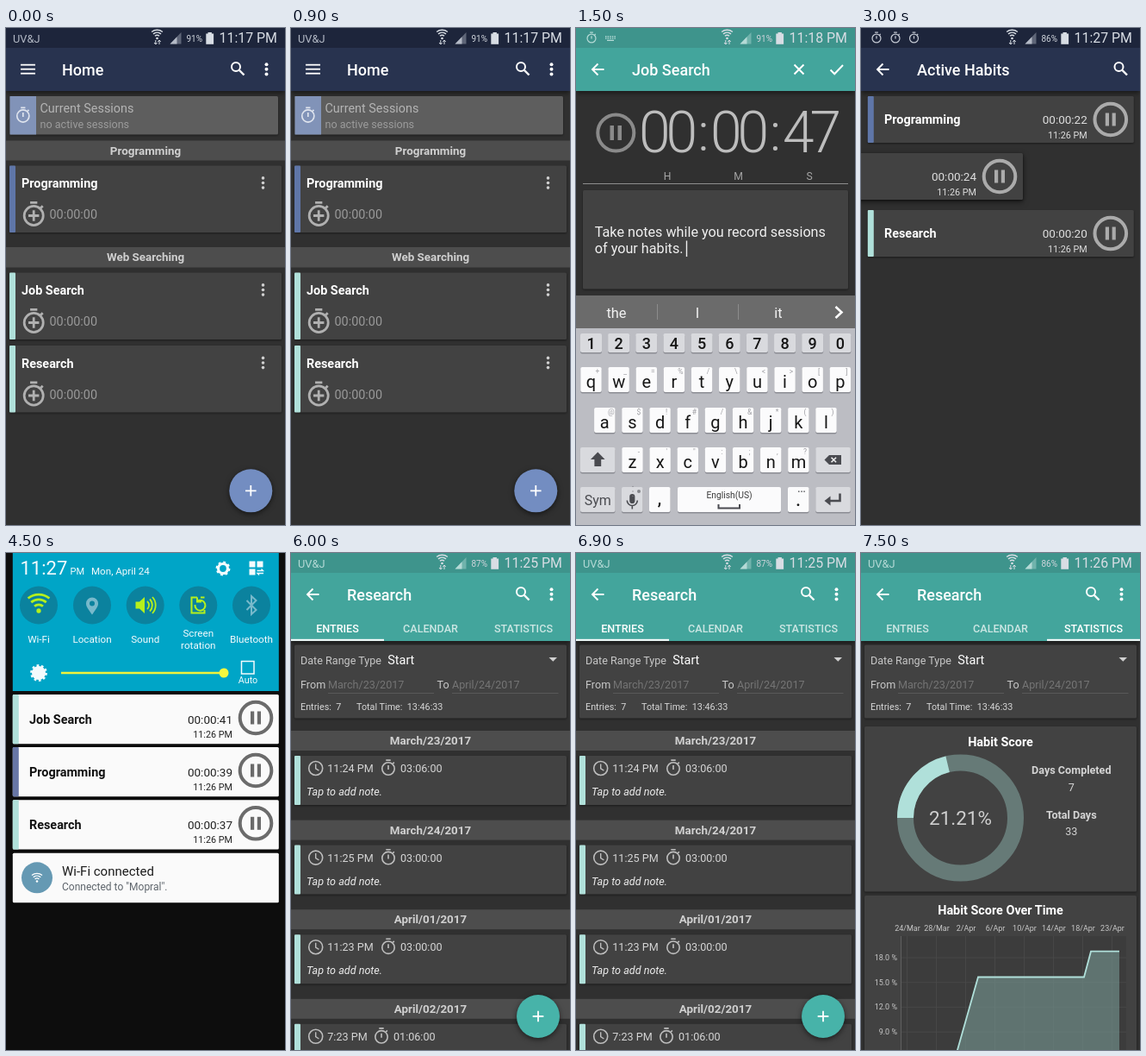
These frames come from a looping animation (324x576 px, 8 s). An HTML page:

```html
<!DOCTYPE html>
<html lang="en">
<head>
<meta charset="utf-8">
<title>Habit timer tour</title>
<style>
html, body { margin: 0; width: 100%; height: 100%; overflow: hidden; background: #303030; }
svg { display: block; width: 100vw; height: 100vh; font-family: Roboto, sans-serif; }
text { white-space: pre; }
.card { filter: drop-shadow(0 1px 1px rgba(0,0,0,.45)); }
.lift { filter: drop-shadow(0 2px 3px rgba(0,0,0,.55)); }
</style>
</head>
<body>
<svg id="stage" viewBox="0 0 324 576"></svg>
<script>
const LENGTH = 8000, STEP = 1500;
const NAVY = { status: '#1d253b', bar: '#28334f', ink: '#b4bac6' };
const TEAL = { status: '#3e948c', bar: '#43a59c', ink: '#b5dad6' };
const BLUE = '#5f76a8', MINT = '#b0e0da', CARD = '#424242';

// Drawing helpers
const rect = (x, y, w, h, fill, extra = '') =>
  `<rect x="${x}" y="${y}" width="${w}" height="${h}" fill="${fill}" ${extra}/>`;
const disc = (x, y, r, fill, extra = '') =>
  `<circle cx="${x}" cy="${y}" r="${r}" fill="${fill}" ${extra}/>`;
const ring = (x, y, r, color, w) => disc(x, y, r, 'none', `stroke="${color}" stroke-width="${w}"`);
const line = (d, color, w = 1, extra = '') =>
  `<path d="${d}" fill="none" stroke="${color}" stroke-width="${w}" ${extra}/>`;
const shape = (d, fill) => `<path d="${d}" fill="${fill}"/>`;
const at = (x, y, s, body) => `<g transform="translate(${x} ${y}) scale(${s})">${body}</g>`;
const text = (x, y, str, size, fill, { w = 400, a = 'start', extra = '' } = {}) =>
  `<text x="${x}" y="${y}" font-size="${size}" fill="${fill}" font-weight="${w}" text-anchor="${a}" ${extra}>${
    String(str).replace(/&/g, '&amp;').replace(/</g, '&lt;')}</text>`;
const mid = (x, y, str, size, fill, w = 400) => text(x, y, str, size, fill, { w, a: 'middle' });
const end = (x, y, str, size, fill) => text(x, y, str, size, fill, { a: 'end' });
const bold = (x, y, str, fill = '#fff') => text(x, y, str, 14.4, fill, { w: 700 });

// Icons
const watch = (x, y, s, color, inner = 'M0-4.5V1', w = 2) => at(x, y, s,
  ring(0, 0, 8, color, w) + line(`M-3-11H3M5.8-6.4L7.6-8.2${inner}`, color, w));
const clock = (x, y, color) => ring(x, y, 8, color, 1.6) + line(`M${x} ${y - 5}v5.4l3.7 2.3`, color, 1.4);
const pause = (x, y, color, r = 18.3, w = 4) => ring(x, y, r, color, w) +
  rect(x - 6, y - 7.5, 4.2, 15, color) + rect(x + 1.8, y - 7.5, 4.2, 15, color);
const dots = (x, y, r, color) => [-5.6, 0, 5.6].map(d => disc(x, y + d, r, color)).join('');
const search = (x, y) => ring(x - 2, y - 2, 5, '#fff', 2) + line(`M${x + 2} ${y + 2}l5.5 5.5`, '#fff', 2.4);
const back = line('M32.5 48H20M25.5 41.5L19 48l6.5 6.5', '#fff', 1.9);
const menu = [42, 47, 52].map(y => rect(17, y - .2, 17, 1.8, '#fff')).join('');
const wifi = (x, y, s, color) => at(x, y, s, disc(0, 0, 1.6, color) +
  line('M-3-3.2A4.5 4.5 0 0 1 3-3.2M-5.3-6A8.2 8.2 0 0 1 5.3-6M-7.5-8.8A11.8 11.8 0 0 1 7.5-8.8', color, 1.7));
const fab = (x, y, fill) => `<g class="lift">${disc(x, y, 25, fill)}</g>` +
  line(`M${x - 6.3} ${y}h12.6M${x} ${y - 6.3}v12.6`, '#fff', 1.8);

// Shared screen parts
function header(theme, title, time, charge, left, height = 50) {
  const c = theme.ink;
  return `<g class="lift">${rect(0, 22, 324, height + 1, theme.bar)}</g>` +
    rect(0, 0, 324, 23, theme.status) + left +
    wifi(175.5, 12, .85, '#d8dde4') +
    line('M173.8 14v5M172 17l1.8 2 1.8-2M178 19v-5M176.3 16l1.7-2 1.7 2', '#d8dde4', 1) +
    shape('M190.5 18.5L203.5 5v13.5z', c + '70') + shape('M190.5 18.5L198.5 10.2v8.3z', c) +
    text(209.5, 16, charge + '%', 10, '#d0d5dc') +
    rect(234.5, 5, 4.4, 2, '#d8dde4') + rect(232.3, 6.5, 8.8, 12.3, '#d8dde4') +
    end(315, 17, time, 15.9, '#d8dde4') +
    text(65, 54.5, title, 18, '#fff', { w: 500 });
}
const carrier = theme => text(8, 16.5, 'UV&J', 12.8, theme.ink);
const card = (x, y, w, h, strip, fill = CARD) =>
  `<g class="card">${rect(x, y, w, h, fill, 'rx="1.5"')}</g>` + (strip ? rect(x, y, 7, h, strip, 'rx="1"') : '');
const section = (y, h, label) => rect(0, y, 324, h, '#4d4d4d') + mid(162, y + 16, label, 13.4, '#d0d0d0', 700);

function home() {
  const habit = (y, name, color) => card(4, y, 316, 77.5, color) + bold(18, y + 25.5, name) +
    dots(298.5, y + 20, 1.8, '#d0d0d0') +
    watch(32.2, y + 58, 1.38, '#b0b0b0', 'M-4.5 0H4.5M0-4.5V4.5') +
    text(50.5, y + 61.8, '00:00:00', 14.4, '#999');
  return header(NAVY, 'Home', '11:17 PM', 91, carrier(NAVY)) + menu + search(269, 47) + dots(302.5, 47.8, 2, '#fff') +
    card(4.5, 79, 311.5, 44.5, '', '#5e5e5e') + rect(4.5, 79, 30.5, 44.5, '#8193b8') +
    watch(19.8, 102, .88, '#dfe4ee', 'M0-4.5V1', 1.9) +
    text(39.5, 98, 'Current Sessions', 14.4, '#b4b4b4') + text(39.5, 115.5, 'no active sessions', 12.6, '#9c9c9c') +
    section(130.5, 23, 'Programming') + habit(159.5, 'Programming', BLUE) +
    section(254, 23.5, 'Web Searching') + habit(283.5, 'Job Search', MINT) + habit(368, 'Research', MINT) +
    fab(284.3, 536.3, '#738dc1');
}

function keyboard() {
  const pitch = 32.15;
  const key = (x, y, w, h, fill = '#fbfbfc') =>
    rect(x, y + 1.5, w, h, '#8c8d94', 'rx="2"') + rect(x, y, w, h, fill, 'rx="2"');
  const row = (keys, hints, x, y) => [...keys].map((k, i) => {
    const cx = x + i * pitch;
    return key(cx - 12.2, y, 24.4, 29) + mid(cx, y + 23.5, k, 20, '#161616') +
      mid(cx + 7.5, y + 7.5, hints[i], 8.5, '#a0a0a5');
  }).join('');
  const soft = '#d9dade', ink = '#4a4b50';
  return rect(0, 310, 324, 38, '#6b6b6b') + line('M94.5 320v18M188.5 320v18', '#8c8c8c') +
    ['the', 'I', 'it'].map((s, i) => mid(47 + 94 * i, 336, s, 16.4, '#f2f2f2')).join('') +
    line('M301.5 323l7 6.5-7 6.5', '#fff', 2.6) +
    rect(0, 348, 324, 228, '#bcbdc3') +
    [...'1234567890'].map((n, i) => key(5 + i * pitch, 354, 25, 22, soft) +
      mid(17.5 + i * pitch, 371.8, n, 18, '#161616', 500)).join('') +
    row('qwertyuiop', '+_=%/\\<>[]', 17.5, 393) +
    row('asdfghjkl', '@$!#/&*()', 33.3, 440) +
    row('zxcvbnm', '-\'":;,?', 65.5, 486) +
    key(5, 486, 40.5, 29, soft) + shape('M25.3 491.5l8.3 8.5h-4.4v8h-7.8v-8h-4.4z', ink) +
    key(278.3, 486, 40.5, 29, soft) + shape('M288.5 500.5l5.5-5.5h14v11h-14z', ink) +
    line('M296.5 497.7l5.6 5.6M302.1 497.7l-5.6 5.6', '#eee', 1.6) +
    key(5, 532, 40.5, 29, soft) + mid(25.2, 552.5, 'Sym', 16, ink) +
    key(53, 532, 24.5, 29, soft) + rect(62.2, 540, 6.2, 11, ink, 'rx="3.1"') +
    line('M59.3 547.5a6 6 0 0 0 12 0M65.3 553.5v4', ink, 1.6) + disc(73, 537, 2, '#85868b') + dots(66, 537, .7, '#85868b') +
    key(85, 532, 24.5, 29) + mid(97, 552, ',', 20, '#161616', 500) +
    key(118, 532, 120, 29) + mid(178, 545.3, 'English(US)', 10.3, '#3c3c3c') +
    line('M165.5 552v4.5h24.500V552', ink, 2) +
    key(246, 532, 24.5, 29) + mid(258, 554, '.', 20, '#161616', 500) + mid(262, 537.5, '...', 11, '#55565a', 700) +
    key(278.3, 532, 40.5, 29, soft) + line('M306.5 539.5v8.500H292', ink, 2.6) + shape('M288.5 548l7-5.5v11z', ink);
}

function recording() {
  const pair = (x, s) => text(x - 2.5, 143.5, s, 66, '#bdbdbd', { w: 300, a: 'middle', extra: 'letter-spacing="-5"' });
  const keys = [0, 1, 2, 3, 4].map(i => `M${34 + i * 2.6} 10h1.5M${34 + i * 2.6} 12.200h1.5`).join('');
  return header(TEAL, 'Job Search', '11:18 PM', 91,
      watch(18, 12, .62, TEAL.ink) + line(keys + 'M36 14.300h8', TEAL.ink, 1.3)) + back +
    line('M253.500 42.500l11 11M264.500 42.500l-11 11', '#fff', 2) + line('M295.500 48.500l4.700 4.700L310 43', '#fff', 2) +
    ring(46.3, 121.500, 21, '#8a8a8a', 4) + rect(39.500, 113, 4.500, 17, '#8a8a8a') + rect(48.500, 113, 4.500, 17, '#8a8a8a') +
    pair(107, '00') + pair(190, '00') + pair(274, '47') +
    [148, 231.500].map(x => mid(x, 141.500, ':', 62, '#bdbdbd', 300)).join('') +
    ['H', 'M', 'S'].map((s, i) => mid(106 + 82.500 * i, 175.800, s, 12.2, '#a6a6a6')).join('') +
    line('M8 180.500H316', '#8e8e8e') + card(8, 188, 308, 114.500) +
    text(21.800, 242, 'Take notes while you record sessions', 16.2, '#f0f0f0') +
    text(21.800, 260.800, 'of your habits.', 16.2, '#f0f0f0') + rect(127.800, 246.500, 1.4, 18.500, '#eee') + keyboard();
}

function active() {
  const run = (x, y, name, time, color) => card(x, y, 309, 54, color) + bold(x + 19.200, y + 32, name) +
    end(x + 255, y + 32, time, 13.5, '#dedede') + end(x + 255, y + 48.500, '11:26 PM', 10.8, '#dedede') +
    pause(x + 282, y + 27, '#ababab');
  return header(NAVY, 'Active Habits', '11:27 PM', 86,
      [18, 40, 61.500].map(x => watch(x, 12, .62, '#c4c9d3')).join('')) + back + search(301.500, 47) +
    run(7.800, 79, 'Programming', '00:00:22', BLUE) +
    `<g class="lift">${run(-121, 145, '', '00:00:24', MINT)}</g>` +
    run(7.800, 211, 'Research', '00:00:20', MINT);
}

function shade() {
  const on = '#b5f01c', off = '#78b9cb', white = '#f4fbfd';
  const label = (x, y, s) => mid(x, y, s, 11.7, white);
  const cog = (x, y, r, n, w, hole) => {
    const c = 2 * Math.PI * (r + 1.4) / (2 * n);
    return ring(x, y, r, white, w) + disc(x, y, r + 1.4, 'none', `stroke="${white}" stroke-width="3" stroke-dasharray="${c}"`) +
      (hole ? '' : disc(x, y, r, white));
  };
  const note = (y, name, time, color) => card(7.800, y, 309, 57.300, color, '#fafafa') + bold(27, y + 33.500, name, '#111') +
    end(263, y + 33.500, time, 13.5, '#222') + end(263, y + 49.500, '11:26 PM', 10.8, '#222') +
    pause(290, y + 27, '#6b6b6b');
  return rect(0, 0, 324, 576, '#0d0d0d') + rect(7.800, 0, 309, 160, '#00a5c7') +
    text(16.500, 25, '11:27', 22, white) + text(74.500, 24.500, 'PM', 11, white) + text(99, 24.500, 'Mon, April 24', 11.6, white) +
    cog(252, 18, 5.5, 8, 3.2, true) +
    rect(282.500, 9.500, 7, 7, white) + rect(291.500, 9.500, 7, 7, white) + rect(282.500, 18.500, 7, 7, white) +
    line('M291.500 20.500h7l-2-2M299 23.500h-7l2 2', white, 1.3) +
    [38, 100, 161.700, 223.300, 285].map(x => disc(x, 60.500, 22, '#0b829e')).join('') +
    wifi(38, 67, 1.65, on) +
    shape('M100 71.500c-4-6-7-9-7-13a7 7 0 0 1 14 0c0 4-3 7-7 13z', off) + disc(100, 58.500, 3, '#0b829e') +
    shape('M150.500 56.500h4.500l6-5.500v19l-6-5.500h-4.500z', on) +
    line('M164 56a6 6 0 0 1 0 9M167 53.500a10 10 0 0 1 0 14M170 51a14 14 0 0 1 0 19', on, 1.8) +
    line('M222 51.500h-6.500v18h15V66M226 51.500h4.500', on, 2) +
    line('M219.500 60a6 6 0 1 0 3-4.500M222 51.500v5h5', on, 2) +
    line('M279.500 55l11 11-5.500 5V50l5.500 5-11 11', off, 2) +
    label(38, 104, 'Wi-Fi') + label(100, 104, 'Location') + label(161.700, 104, 'Sound') +
    label(223.300, 97, 'Screen') + label(223.300, 110.500, 'rotation') + label(285, 104, 'Bluetooth') +
    cog(38, 139, 7, 10, 2, false) +
    line('M64 139H253', '#f0f23c', 2.6) + disc(253, 139, 5.5, '#f6f83e') +
    rect(273.500, 125.500, 14.500, 14.500, 'none', `stroke="${white}" stroke-width="1.5"`) + mid(281, 151, 'Auto', 10.8, white) +
    note(164, 'Job Search', '00:00:41', MINT) + note(225, 'Programming', '00:00:39', '#6877a6') +
    note(286.300, 'Research', '00:00:37', MINT) +
    card(7.800, 347.800, 309, 57.500, '', '#fafafa') + disc(36, 376.300, 18, '#6599b3') + wifi(36, 380.500, .8, '#fff') +
    text(65, 374, 'Wi-Fi connected', 15, '#1c1c1c') + text(65, 390.500, 'Connected to "Mopral".', 12, '#5d646b');
}

function research(time, charge, tab, body) {
  const range = (x, label, dx, date, to) => text(x, 156.500, label, 12.6, '#c8c8c8') +
    text(dx, 156.500, date, 12.6, '#757575') + line(`M${dx} 162.500H${to}`, '#595959');
  return body + header(TEAL, 'Research', time, charge, carrier(TEAL), 79) +
    back + search(269, 47) + dots(302.500, 47.800, 2, '#fff') +
    ['ENTRIES', 'CALENDAR', 'STATISTICS'].map((s, i) =>
      mid(54 + 108 * i, 92, s, 12.6, i === tab ? '#fff' : '#cbe6e3', 500)).join('') +
    rect(108 * tab, 99.800, 108, 2, '#fff') + card(4, 106.500, 316, 85) +
    text(11, 129, 'Date Range Type', 12.6, '#c8c8c8') + text(112.300, 129, 'Start', 14.4, '#fff') +
    shape('M299.500 121h9.500l-4.700 4.800z', '#d0d0d0') +
    range(11, 'From', 43, 'March/23/2017', 166) + range(169.500, 'To', 187, 'April/24/2017', 310.500) +
    text(11, 182, 'Entries:  7', 10.8, '#d6d6d6') + text(76, 182, 'Total Time:', 10.8, '#d6d6d6') +
    text(134.800, 182, '13:46:33', 10.8, '#d6d6d6');
}

function entries() {
  const items = [
    ['March/23/2017', '11:24 PM', '03:06:00'], ['March/24/2017', '11:25 PM', '03:00:00'],
    ['April/01/2017', '11:23 PM', '03:00:00'], ['April/02/2017', '7:23 PM', '01:06:00']];
  const list = items.map(([date, start, span], i) => {
    const y = 206 + 103.600 * i, dx = start.length > 7 ? 0 : -8;
    return section(y, 23, date) + card(4, y + 29, 316, 57, MINT) +
      clock(28.700, y + 43.500, '#bdbdbd') + text(42.300, y + 48, start, 12.6, '#d6d6d6') +
      watch(113 + dx, y + 44, .9, '#bdbdbd', 'M0-4.5V1', 1.8) + text(127 + dx, y + 48, span, 12.6, '#d6d6d6') +
      text(18, y + 75, 'Tap to add note.', 12.6, '#ececec', { extra: 'font-style="italic"' });
  }).join('');
  return research('11:25 PM', 87, 0, list + fab(287, 537, '#47b3a9'));
}

function stats() {
  const r = 64, turn = 2 * Math.PI * r, score = 7 / 33;
  const days = ['24/Mar', '28/Mar', '2/Apr', '6/Apr', '10/Apr', '14/Apr', '18/Apr', '23/Apr'];
  const gx = i => 53.500 + 34 * i, gy = i => 469 + 28.700 * i;
  const curve = 'M108 590L136 491.500H259L267 461.700H300';
  const body = card(4, 201, 316, 191.500) + mid(162, 223.800, 'Habit Score', 14.4, '#fff', 700) +
    ring(115.500, 307, r, '#667a77', 19) +
    disc(115.500, 307, r, 'none', `stroke="${MINT}" stroke-width="19" stroke-dasharray="${turn * score} ${turn}" transform="rotate(180 115.5 307)"`) +
    mid(115.500, 315, '21.21%', 22.5, '#cfcfcf') +
    mid(244.300, 256, 'Days Completed', 12.6, '#d4d4d4', 700) + mid(244.300, 276, '7', 12.6, '#d4d4d4') +
    mid(244.300, 307.500, 'Total Days', 12.6, '#d4d4d4', 700) + mid(244.300, 327, '33', 12.6, '#d4d4d4') +
    card(4, 397, 316, 190) + mid(162, 419, 'Habit Score Over Time', 14.4, '#fff', 700) +
    rect(46, 444, 262, 140, '#3c3c3c') +
    days.map((d, i) => line(`M${gx(i)} 444V576`, '#4b4b4b', .8) + mid(gx(i) + .5, 438, d, 9, '#c8c8c8')).join('') +
    ['18.0 %', '15.0 %', '12.0 %', '9.0 %'].map((s, i) =>
      line(`M46 ${gy(i)}H308`, '#4b4b4b', .8) + end(42, gy(i) + 3, s, 9, '#c8c8c8')).join('') +
    line('M46.500 444V576', '#606060') +
    shape(curve + 'V590z', 'rgba(113,142,137,.68)') + line(curve, MINT, 1.8);
  return research('11:26 PM', 86, 2, body);
}

const stage = document.getElementById('stage');
stage.innerHTML = [home, recording, active, shade, entries, stats].map(scene =>
  `<g visibility="hidden">${rect(0, 0, 324, 576, '#303030')}${scene()}</g>`).join('');
const scenes = [...stage.children];

function render(ms) {
  const now = Math.floor(ms % LENGTH / STEP);
  scenes.forEach((g, i) => g.setAttribute('visibility', i === now ? 'visible' : 'hidden'));
}

const began = performance.now();
function tick() {
  render(performance.now() - began);
  requestAnimationFrame(tick);
}
tick();
</script>
</body>
</html>
```
